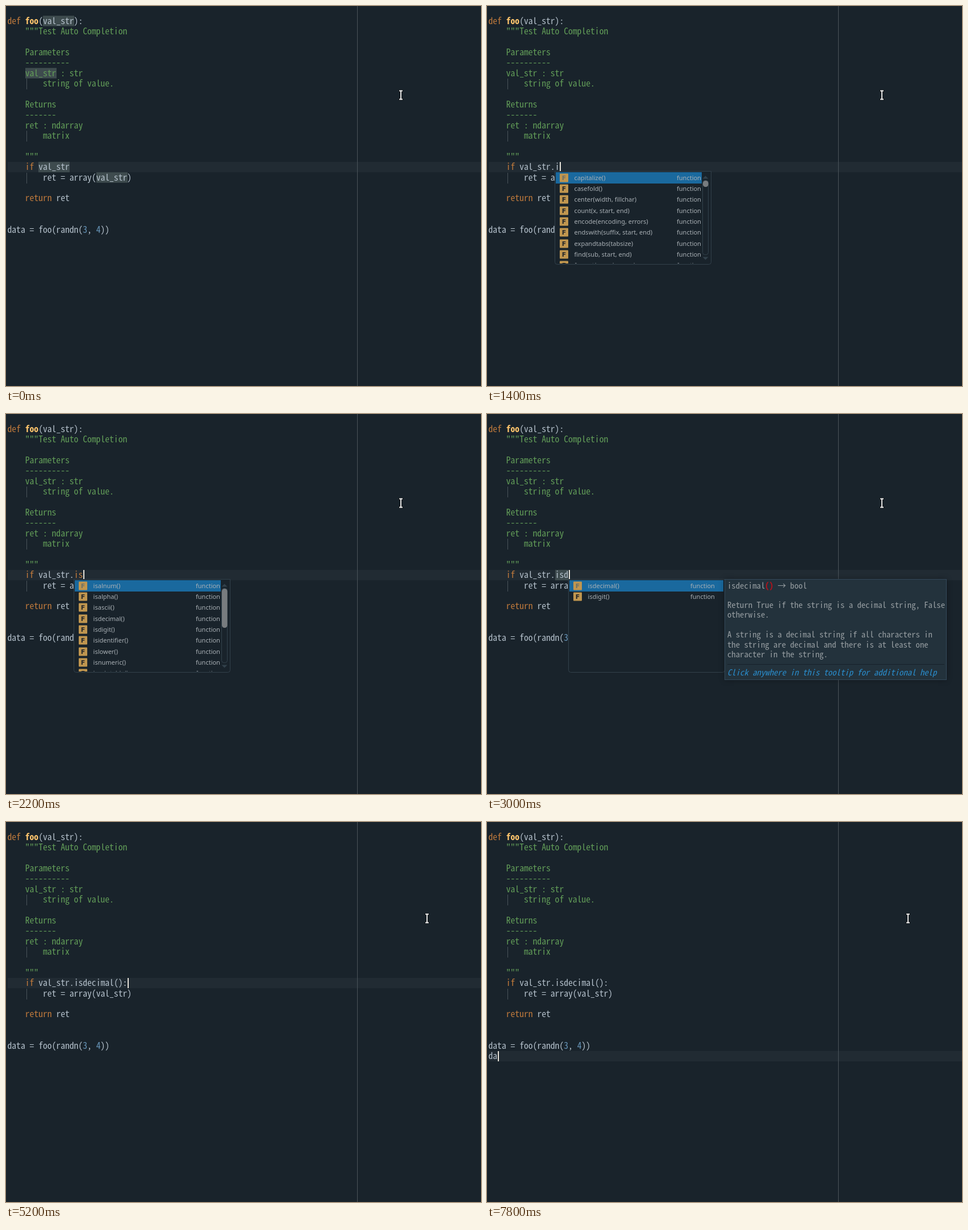
These frames come from a looping animation (836x670 px, 8 s). An HTML page with a canvas:

```html
<!DOCTYPE html>
<html lang="en">
<head>
<meta charset="utf-8">
<title>Code completion</title>
<style>
  html, body { margin: 0; width: 100%; height: 100%; overflow: hidden; background: #19232b; }
  canvas { display: block; }
</style>
</head>
<body>
<canvas id="stage" width="836" height="670"></canvas>
<script>
const ctx = document.getElementById('stage').getContext('2d');
const LOOP = 8000, LEFT = 2.5, TOP = 17.6, CELL = 7.81, PITCH = 18.4;
const TIP_CELL = 7.37, TIP_PITCH = 17.5, ROW = 19.36;
const MONO = '"Noto Sans Mono CJK JP", "Noto Sans Mono CJK KR", "Noto Sans Mono CJK SC", "Noto Sans Mono", monospace';
const SANS = '"Noto Sans", "Open Sans", sans-serif';
const C = {
  bg: '#19232b', line: '#212b33', text: '#b4c0cb', key: '#c07a3c', name: '#ffc66d',
  doc: '#629d58', num: '#6897bb', mark: '#3e4b4e', guide: '#4a535a', border: '#32414b',
  select: '#1a699e', item: '#a9b0b5', icon: '#c0964f', tip: '#23323c', tipText: '#969da1',
  link: '#2a8dcc', red: '#b5121b'
};

// Pick the font size whose character advance equals the grid cell.
function monoSize(cell) {
  ctx.font = `100px ${MONO}`;
  return cell * 100 / ctx.measureText('0').width;
}
const codeSize = monoSize(CELL), tipSize = monoSize(TIP_CELL);

// Code lines: [line number, [column, text, color, weight]...]
const code = [
  [0, [0, 'def', C.key], [4, 'foo', C.name, 'bold'], [7, '(val_str):', C.text]],
  [1, [4, '"""Test Auto Completion', C.doc]],
  [3, [4, 'Parameters', C.doc]],
  [4, [4, '----------', C.doc]],
  [5, [4, 'val_str : str', C.doc]],
  [6, [8, 'string of value.', C.doc]],
  [8, [4, 'Returns', C.doc]],
  [9, [4, '-------', C.doc]],
  [10, [4, 'ret : ndarray', C.doc]],
  [11, [8, 'matrix', C.doc]],
  [13, [4, '"""', C.doc]],
  [14, [4, 'if', C.key], [7, 'val_str', C.text]],
  [15, [8, 'ret = array(val_str)', C.text]],
  [17, [4, 'return', C.key], [11, 'ret', C.text]],
  [20, [0, 'data = foo(randn(', C.text], [17, '3', C.num], [18, ', ', C.text], [20, '4', C.num], [21, '))', C.text]]
];

const lists = {
  all: ['capitalize()', 'casefold()', 'center(width, fillchar)', 'count(x, start, end)',
    'encode(encoding, errors)', 'endswith(suffix, start, end)', 'expandtabs(tabsize)',
    'find(sub, start, end)', 'format(args, kwargs)'],
  i: ['index(sub, start, end)', 'isalnum()', 'isalpha()', 'isascii()', 'isdecimal()',
    'isdigit()', 'isidentifier()', 'islower()', 'isnumeric()'],
  is: ['isalnum()', 'isalpha()', 'isascii()', 'isdecimal()', 'isdigit()',
    'isidentifier()', 'islower()', 'isnumeric()', 'isprintable()'],
  isd: ['isdecimal()', 'isdigit()']
};

const tips = {
  capitalize: { x: 394, w: 380, type: 'str', body: [
    'Return a capitalized version of the string.', '',
    'More specifically, make the first character have',
    'upper case and the rest lower case.'] },
  isdecimal: { x: 418, w: 391, type: 'bool', body: [
    'Return True if the string is a decimal string, False',
    'otherwise.', '',
    'A string is a decimal string if all characters in',
    'the string are decimal and there is at least one',
    'character in the string.'] }
};

const words = [[0, 8, 7], [5, 4, 7], [14, 7, 7], [15, 20, 7]];

// Each step changes only the listed parts of the state.
const steps = [
  [0, { line: 14, tail: '', last: '', caret: null, marks: words, list: '', bar: 11, tip: '', mouse: [695, 157] }],
  [500, { caret: 14 }],
  [800, { tail: '.', caret: null, marks: [] }],
  [1000, { list: 'all', tip: 'capitalize' }],
  [1400, { tail: '.i', caret: 16, tip: '' }],
  [1500, { list: 'i', tip: 'capitalize' }],
  [1700, { tip: '', bar: 35 }],
  [2000, { tail: '.is', caret: 17, list: 'is', tip: 'capitalize' }],
  [2200, { tip: '', bar: 69 }],
  [2500, { tail: '.isd', caret: 18, list: '' }],
  [2600, { list: 'isd', tip: 'isdecimal' }],
  [3000, { marks: [[14, 15, 3]] }],
  [3500, { marks: [], list: '', tip: '', caret: null }],
  [3600, { tail: '.isdecimal' }],
  [4100, { tail: '.isdecimal()' }],
  [4500, { caret: 26, mouse: [718, 163] }],
  [4600, { mouse: [741, 170] }],
  [5200, { tail: '.isdecimal():', caret: 27 }],
  [5700, { caret: null }],
  [6100, { line: 15, caret: 28 }],
  [6600, { line: 20, caret: 23 }],
  [6700, { line: 21, caret: 0 }],
  [7200, { caret: null }],
  [7600, { last: 'd', caret: 1 }],
  [7800, { last: 'da', caret: 2 }]
];

const colX = col => LEFT + col * CELL;
const lineY = line => TOP + line * PITCH;

function rect(x, y, w, h, color) {
  ctx.fillStyle = color;
  ctx.fillRect(x, y, w, h);
}

function round(x, y, w, h, r, fill, stroke) {
  ctx.beginPath();
  ctx.roundRect(x, y, w, h, r);
  if (fill) { ctx.fillStyle = fill; ctx.fill(); }
  if (stroke) { ctx.strokeStyle = stroke; ctx.lineWidth = 1; ctx.stroke(); }
}

function text(str, x, y, color, font) {
  ctx.font = font;
  ctx.fillStyle = color;
  ctx.fillText(str, x, y);
}

function codeText(line, col, str, color, weight = '') {
  text(str, colX(col), Math.round(lineY(line) + 14), color, `${weight} ${codeSize}px ${MONO}`);
}

function drawEditor(s) {
  rect(0, 0, 836, 670, C.bg);
  rect(3, lineY(s.line) - 0.4, 833, PITCH, C.line);
  rect(618, 0, 1, 670, C.guide);
  for (const [line, col, len] of s.marks)
    rect(Math.round(colX(col)), lineY(line) - 0.4, Math.round(len * CELL), PITCH, C.mark);
  for (const line of [6, 11, 15]) rect(36, Math.round(lineY(line)), 1, 19, C.guide);
  for (const [line, ...parts] of code)
    for (const part of parts) codeText(line, ...part);
  if (s.tail === '.is') {
    codeText(14, 14, '.', C.text);
    codeText(14, 15, 'is', C.key);
  } else codeText(14, 14, s.tail, C.text);
  codeText(21, 0, s.last, C.text);
  if (s.caret !== null)
    rect(Math.round(colX(s.caret) + 0.5), Math.round(lineY(s.line)), 2, 18, '#e6e2d8');
}

function triangle(x, y, dir) {
  ctx.beginPath();
  ctx.moveTo(x - 5, y + 2.5 * dir);
  ctx.lineTo(x + 5, y + 2.5 * dir);
  ctx.lineTo(x, y - 2.5 * dir);
  ctx.fillStyle = C.border;
  ctx.fill();
}

function drawList(s) {
  const items = lists[s.list], scrolls = items.length > 8;
  const x = scrolls ? 119 : 143, right = scrolls ? 378 : 416;
  round(x + 0.5, 291.5, 275, 164, [0, 0, 4, 4], C.bg, C.border);
  ctx.save();
  ctx.beginPath();
  ctx.rect(x + 2, 293, right - x - 2, 161);
  ctx.clip();
  rect(x + 2, 293, right - x - 2, 20, C.select);
  items.forEach((item, i) => {
    const mid = Math.round(302.5 + i * ROW), font = `11px ${SANS}`;
    round(x + 9, mid - 7.5, 15, 15, 1, C.icon);
    ctx.textAlign = 'center';
    text('F', x + 16.5, mid + 4, i ? '#26282a' : '#6d7268', 'bold 11px "DejaVu Sans", sans-serif');
    ctx.textAlign = 'left';
    text(item, x + 34.6, mid + 4, C.item, font);
    text('function', x + 215, mid + 4, C.item, font);
  });
  ctx.restore();
  if (!scrolls) return;
  round(379.5, 307.5, 10, 131, 4, null, C.border);
  round(380, 308, 9.5, s.bar, 4.5, '#787c7f');
  triangle(384.5, 302, 1);
  triangle(384.5, 445, -1);
}

function drawTip(name) {
  const { x, w, type, body } = tips[name];
  const left = x + 5, lastY = 302.5 + (body.length + 1) * TIP_PITCH;
  const font = `${tipSize}px ${MONO}`;
  const put = (col, str, y, color, style = '') =>
    text(str, left + col * TIP_CELL, Math.round(y + 4.4), color, `${style} ${font}`);
  ctx.save();
  ctx.shadowColor = 'rgba(0, 0, 0, 0.3)';
  ctx.shadowBlur = 10;
  rect(x, 291, w, lastY + 44 - 291, C.tip);
  ctx.restore();
  ctx.strokeStyle = '#34495a';
  ctx.lineWidth = 1;
  ctx.strokeRect(x + 0.5, 291.5, w - 1, Math.round(lastY + 43.5 - 291.5));
  const n = name.length, head = 303.2;
  put(0, name, head, C.tipText);
  put(n, '()', head, C.red, 'bold');
  put(n + 3, '→', head, C.tipText);
  put(n + 6, type, head, C.tipText);
  body.forEach((str, i) => put(0, str, 302.5 + (i + 2) * TIP_PITCH, C.tipText));
  rect(left, Math.round(lastY + 16), w - 9, 1, '#17212a');
  put(0, 'Click anywhere in this tooltip for additional help', lastY + 31.5, C.link, 'italic');
}

function drawMouse([x, y]) {
  const beam = (color, width) => {
    ctx.strokeStyle = color;
    ctx.lineWidth = width;
    ctx.lineCap = 'square';
    ctx.beginPath();
    for (const end of [-7.5, 7.5]) {
      ctx.moveTo(x - 2, y + end);
      ctx.lineTo(x + 2, y + end);
    }
    ctx.moveTo(x, y - 7);
    ctx.lineTo(x, y + 7);
    ctx.stroke();
  };
  beam('#0b0f12', 3.6);
  beam('#f2f2f2', 1.9);
}

function frame(now) {
  const t = now % LOOP, s = {};
  for (const [start, change] of steps) if (start <= t) Object.assign(s, change);
  drawEditor(s);
  if (s.list) drawList(s);
  if (s.tip) drawTip(s.tip);
  drawMouse(s.mouse);
}

const begin = performance.now();
function tick() {
  frame(performance.now() - begin);
  requestAnimationFrame(tick);
}
tick();
</script>
</body>
</html>
```
